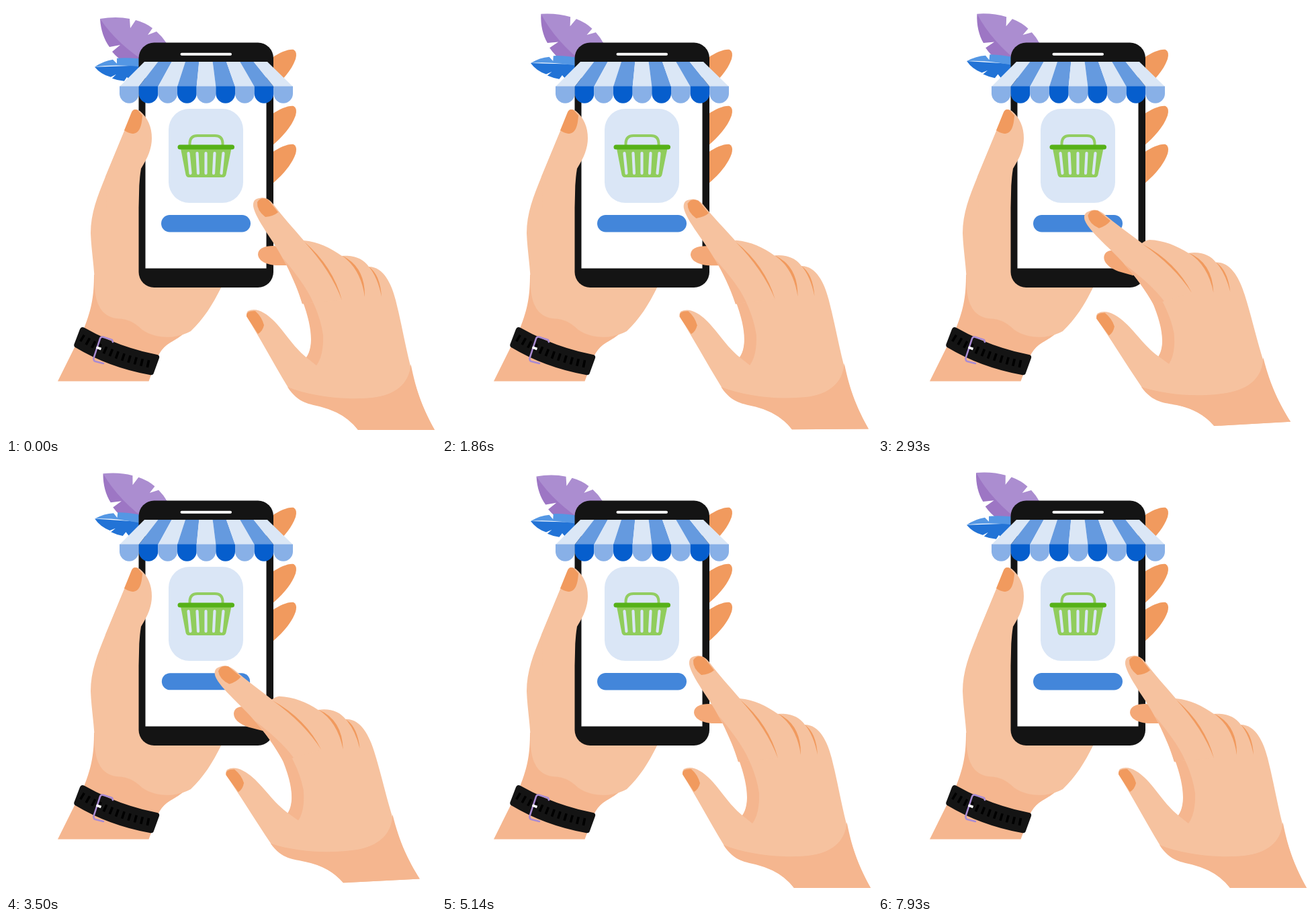
Write an HTML page that moves like this. It is 640 px wide and 640 px high and loops after 8000 ms.

```html
<!DOCTYPE html>
<html lang="en">
<head>
<meta charset="utf-8">
<title>Mobile shopping</title>
<style>
  html, body { margin: 0; width: 100%; height: 100%; overflow: hidden; background: #fff; }
  svg { display: block; width: 100%; height: 100%; }
  .skin { fill: #f6c29f; }
  .shade { fill: #f5b68f; }
  .nail { fill: #f19a5e; }
  .black { fill: #141414; }
  .line { fill: none; stroke-linecap: round; stroke-linejoin: round; }
</style>
</head>
<body>
<svg viewBox="0 0 640 640">
  <g id="purpleLeaf">
    <path fill="#9d76c4" d="M140 19C141 36 146 50 154 61L170 58L158 68Q167 79 180 86L225 92L205 75Z"/>
    <path fill="#ab8dd0" d="M140 19Q164 15 184 19L185 33L193 21Q208 25 218 33L211 43L224 38Q232 45 238 54L250 80L215 88Q166 58 140 19Z"/>
  </g>
  <g id="blueLeaf">
    <path fill="#2273d6" d="M132 91Q141 102 156 106L164 102L158 108Q166 111 176 112L180 106L186 112L215 112V88Z"/>
    <path fill="#5497e4" d="M132 91Q145 82 159 80L165 86V78Q182 76 215 80V92Q165 86 132 91Z"/>
  </g>

  <defs>
    <path id="fingertip" class="nail" d="M396 161C408 153 420 148 428 149Q434 152 431 163C425 180 411 195 396 208Z"/>
  </defs>
  <use href="#fingertip" y="-84"/>
  <use href="#fingertip"/>
  <use href="#fingertip" y="57"/>

  <!-- holding hand -->
  <path class="shade" d="M77 558.5L116 480C128 450 131 430 131 400L320 419C301 453 278 482 248 499Q229 509 224 528L212.500 558.500Z"/>
  <path class="skin" d="M132 418C133 442 142 462 164 465C181 466 189 469 203 482C223 496 252 496 275 484C294 466 308 444 320 419V300L200 243L190 154L177 184L148 254C136 284 126 308 126 338C127 365 132 390 132 418Z"/>

  <!-- phone -->
  <rect class="black" x="197.500" y="54.500" width="200.500" height="364.500" rx="23"/>
  <rect x="207.500" y="83" width="180" height="307.500" fill="#fff"/>
  <path class="line" stroke="#fff" stroke-width="4" d="M261.500 71.800H334"/>
  <rect x="242" y="153" width="111" height="140" rx="31" fill="#dae6f6"/>
  <path class="line" stroke="#92cd61" stroke-width="4" d="M273.500 208V204Q274 193 285 193H311Q322 193 322.500 204V208"/>
  <path fill="#90cd5c" d="M260 212H335.500L327.500 251Q326.500 255 323 255H272Q268.500 255 267.500 251Z"/>
  <path class="line" stroke="#dae6f6" stroke-width="4.200" d="M271.500 219L274.500 249M284.500 219L286 249M297.500 219V249M310.500 219L309 249M323.500 219L320.500 249"/>
  <rect x="255.500" y="206.500" width="84.500" height="7" rx="3.500" fill="#56b118"/>
  <rect id="button" x="231" y="311" width="133" height="25.500" rx="12.750" fill="#4386da"/>
  <g id="awning"></g>

  <!-- thumb over the phone edge -->
  <path class="skin" d="M198 280Q198 260 201 242C211 226 217 212 217 197C217 180 211 166 199 156Q190 151 187 159L177 184L148 254L150 300H197Z"/>
  <path class="nail" d="M176 185L187 158Q190 152 196 155L203 163C202 180 198 190 188 190Q181 189 176 185Z"/>

  <!-- wrist band -->
  <path class="black" d="M117 479Q168 508 225 519Q229 520 228 524L220 546Q219 550 214 549Q153 538 103 508Q100 506 102 502L110 481Q112 476 117 479Z"/>
  <path fill="none" stroke="#000" stroke-width="11" stroke-dasharray="3.600 6" d="M112 493.500Q160 523 219 534"/>
  <path class="line" stroke="#a98bd2" stroke-width="2.500" d="M159 500L158 497L144 492.500Q141 492 140 495L130.500 524Q130 528 133 529L145 532"/>
  <path stroke="#fff" stroke-width="3.500" d="M134.500 508L141.500 510.500"/>

  <!-- tapping hand -->
  <g id="hand">
    <path id="folded" fill="#f4a877" d="M375 370C375 361 384 357 398 357L420 360L425 386H402C388 385 376 380 375 370Z"/>
    <path class="skin" d="M524 631H638C622 602 611 576 602 536C594 505 589 473 580 438C574 414 562 388 540 388C533 377 518 370 500 372C483 360 465 351 443 349Q434 350 429 356L416 382C432 414 444 440 451 467C456 490 456 512 447 523C423 504 407 470 384 457Q371 449 360 454Q356 458 360 465C380 498 400 535 420 568C440 600 493 588 524 631Z"/>
    <path class="shade" d="M524 631H638C622 602 611 576 602.500 533C600 563 579 579 545 583C502 587 455 581 419 567C435 592 452 592 470 597Q505 606 524 631Z"/>
    <path class="shade" d="M418 386L440 410C454 432 468 460 472 490Q473 520 462 535L447 523C458 507 456 478 441 438Z"/>
    <path class="nail" d="M358 462Q357 453 371 454Q381 463 384 475Q382 484 375 488Z"/>
    <path class="nail" d="M500 371.500Q535 388 534 433Q528 391 500 371.500ZM540 388Q557 400 559 433Q553 403 540 388Z"/>
    <g id="index">
      <path class="skin" d="M368 298Q367 287 377 286Q388 283 397 294C412 314 428 331 444 350L500 438L458 441L441 443C433 418 424 397 412 376C400 352 371 317 368 298Z"/>
      <path class="shade" d="M412 375C432 399 448 420 457 441L441 443.500C434 419 424 397 412 375Z"/>
      <path class="nail" d="M374 292Q379 283 390 288L405 307Q398 313 386 314Q373 304 374 292Z"/>
      <path class="nail" d="M444 351Q487 388 500 438Q483 393 444 351Z"/>
    </g>
  </g>
</svg>
<script>
const LOOP = 8000;
const el = id => document.getElementById(id);

function buildAwning() {
  const count = 9, left = 169, width = 28.67, topLeft = 206, topWidth = 20.33;
  let markup = '';
  for (let i = 0; i < count; i++) {
    const x = left + i * width, top = topLeft + i * topWidth, r = width / 2;
    const [stripe, scallop] = i % 2 ? ['#659adf', '#065ecd'] : ['#dbe7f6', '#88b0e7'];
    markup += `<path fill="${stripe}" d="M${top} 83h${topWidth}L${x + width} 120h${-width}Z"/>` +
      `<path fill="${scallop}" d="M${x} 119.500h${width}v10.800a${r} ${r} 0 0 1 ${-width} 0Z"/>`;
  }
  el('awning').innerHTML = markup;
}

// Eased value from a list of [time, value] keys.
function track(t, keys) {
  if (t <= keys[0][0]) return keys[0][1];
  for (let i = 1; i < keys.length; i++) {
    const [t0, a] = keys[i - 1], [t1, b] = keys[i];
    if (t < t1) {
      const u = (t - t0) / (t1 - t0);
      return a + (b - a) * u * u * (3 - 2 * u);
    }
  }
  return keys[keys.length - 1][1];
}

const swing = (t, start, period) => (1 - Math.cos((t - start) / period * 2 * Math.PI)) / 2;
const transform = (id, value) => el(id).setAttribute('transform', value);

function draw(t) {
  transform('purpleLeaf', `rotate(${6.8 * swing(t, 50, 4700)} 214 86)`);
  transform('blueLeaf', `rotate(${5.8 * swing(t, -500, 8000)} 225 88)`);

  const reach = track(t, [[1520, 0], [3030, 1], [3240, 1], [4740, 0]]);
  const lift = track(t, [[1520, 0], [3030, -6], [3900, -9], [5000, 0]]);
  const bend = track(t, [[1520, 0], [3030, 1], [3240, 1], [5000, 0]]);
  transform('hand', `translate(${-24 * reach} ${lift}) rotate(${-3.2 * reach} 524 631)`);
  transform('index', `rotate(${-9.5 * bend} 461 424)`);
  transform('folded', `rotate(${20 * reach * bend} 377 368)`);

  const press = track(t, [[3000, 1], [3300, 0.95], [3600, 1]]);
  transform('button', `translate(297.5 323.75) scale(${press}) translate(-297.5 -323.75)`);
}

function frame() {
  draw(performance.now() % LOOP);
  requestAnimationFrame(frame);
}

buildAwning();
frame();
</script>
</body>
</html>
```
